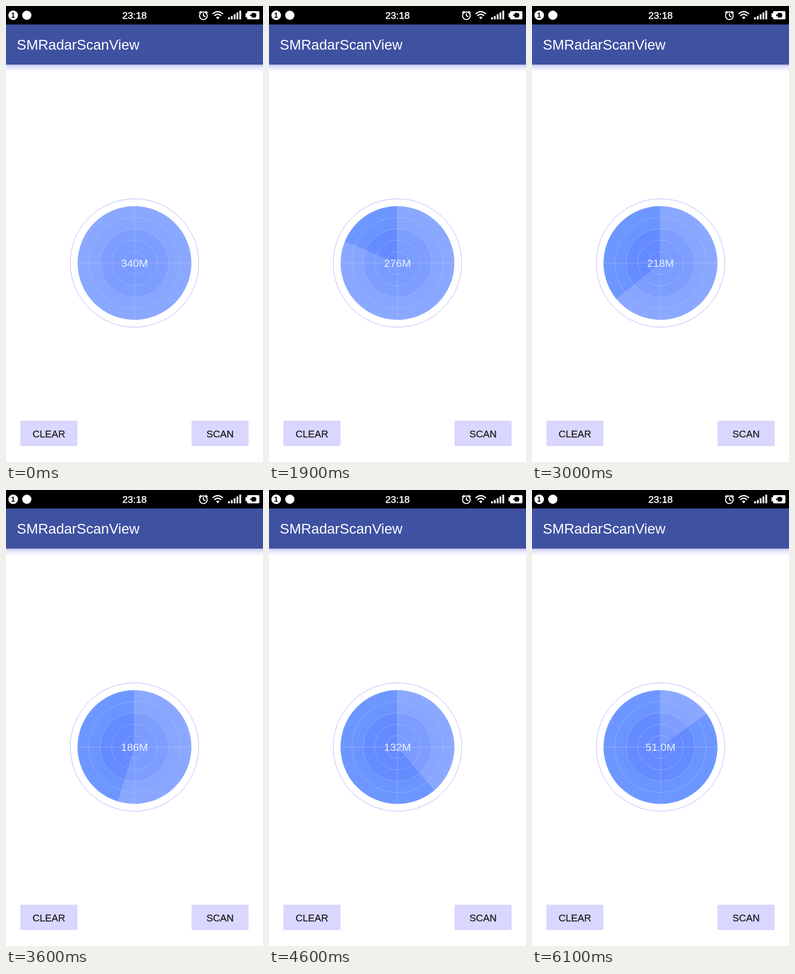
An HTML page for the animation above (6.2 s loop, 500 by 888 pixels).

```html
<!DOCTYPE html>
<html lang="en">
<head>
<meta charset="utf-8">
<title>Radar scan</title>
<style>
  html, body { margin: 0; width: 100%; height: 100%; overflow: hidden; background: #fff; }
  svg { display: block; width: 100%; height: 100%; font-family: "Liberation Sans", Arial, sans-serif; }
  .button { fill: #d9d7ff; }
  .mid { text-anchor: middle; }
  .line { fill: none; stroke: #fff; stroke-width: 2; }
  .grid { fill: none; stroke: #b4cbff; stroke-opacity: .5; }
</style>
</head>
<body>
<svg viewBox="0 0 500 888">
  <defs>
    <linearGradient id="shadow" x2="0" y2="1">
      <stop stop-color="#b3b9e4"/>
      <stop offset=".25" stop-color="#e0defa"/>
      <stop offset="1" stop-color="#fff"/>
    </linearGradient>
    <radialGradient id="light" gradientUnits="userSpaceOnUse" cx="250" cy="500.5" r="111">
      <stop stop-color="#7799ff"/>
      <stop offset=".6" stop-color="#7f9fff"/>
      <stop offset=".6" stop-color="#87a5ff"/>
      <stop offset="1" stop-color="#8ba9ff"/>
    </radialGradient>
    <radialGradient id="dark" gradientUnits="userSpaceOnUse" cx="250" cy="500.5" r="111">
      <stop stop-color="#6489ff"/>
      <stop offset=".6" stop-color="#648cff"/>
      <stop offset=".6" stop-color="#6a93ff"/>
      <stop offset="1" stop-color="#6e98ff"/>
    </radialGradient>
  </defs>
  <rect width="500" height="888" fill="#fff"/>

  <!-- status bar -->
  <rect width="500" height="36"/>
  <g fill="#fff">
    <circle cx="14" cy="18" r="9.3"/>
    <text class="mid" x="13.7" y="23" font-size="14" font-weight="bold" fill="#000">1</text>
    <circle cx="40.5" cy="18" r="9"/>
    <text class="mid" x="250" y="25" font-size="19" stroke="#fff" stroke-width=".5">23:18</text>
    <g class="line">
      <circle cx="384" cy="19" r="7.5"/>
      <path d="M384 14V19L388 21M375.500 13.500L380 10M392.500 13.500L388 10"/>
      <path d="M402 15.500Q412 6.500 422 15.500M405.500 19Q412 13 418.500 19" stroke-width="2.4"/>
    </g>
    <path d="M408.500 22Q412 19 415.500 22L412 26Z"/>
    <path d="M432 22h3.500v4h-3.500zM437.500 19.500h3.500v6.500h-3.500zM443 16h3.500v10h-3.500zM448.500 12.500h3.500v13.500h-3.500zM454 9h3.500v17h-3.500z"/>
    <path d="M471 10h20q2 0 2 2v12q0 2-2 2h-20q-2 0-2-2v-2h-3v-8h3v-2q0-2 2-2z"/>
    <path d="M475 16.500h3v-3h5q4 0 4 4.500t-4 4.500h-5v-3h-3z" fill="#000"/>
  </g>

  <!-- title bar -->
  <rect y="36" width="500" height="78" fill="#3f51a1"/>
  <rect y="114" width="500" height="14" fill="url(#shadow)"/>
  <text x="21" y="85" font-size="27.600" fill="#fff">SMRadarScanView</text>

  <!-- radar -->
  <circle cx="250" cy="500.500" r="125" fill="none" stroke="#b9b4ff"/>
  <circle cx="250" cy="500.500" r="110.700" fill="url(#light)"/>
  <path id="sweep" fill="url(#dark)"/>
  <g class="grid">
    <circle cx="250" cy="500.500" r="22.200"/>
    <circle cx="250" cy="500.500" r="44.400"/>
    <circle cx="250" cy="500.500" r="66.600"/>
    <circle cx="250" cy="500.500" r="88.800"/>
    <path d="M139.500 500.500H360.500M250 390V611"/>
  </g>
  <text id="range" class="mid" x="250" y="508" font-size="21" fill="#fff" fill-opacity=".85"></text>

  <!-- buttons -->
  <rect class="button" x="28" y="807.500" width="111" height="49.500" rx="2"/>
  <rect class="button" x="361" y="807.500" width="111" height="49.500" rx="2"/>
  <g class="mid" font-size="19" fill="#1b1a1e" stroke="#1b1a1e" stroke-width=".3">
    <text x="83.500" y="840">CLEAR</text>
    <text x="416.500" y="840">SCAN</text>
  </g>
</svg>
<script>
  const LOOP = 6200, STEP = 100, FULL = 340;
  const CX = 250, CY = 500.5, R = 110.7;
  // [time in ms, range in metres]
  const keys = [[0, 340], [730, 340], [1100, 320], [1900, 276], [3000, 218],
                [3600, 186], [4600, 132], [6100, 51]];
  const sweep = document.getElementById("sweep");
  const range = document.getElementById("range");

  function rangeAt(t) {
    const i = Math.max(1, keys.findIndex(k => k[0] >= t));
    const [t0, v0] = keys[i - 1], [t1, v1] = keys[i];
    return v0 + (v1 - v0) * (t - t0) / (t1 - t0);
  }

  function draw(now) {
    const t = Math.floor(now % LOOP / STEP) * STEP;
    const v = rangeAt(t);
    const a = v / FULL * 2 * Math.PI;
    const x = CX + R * Math.sin(a), y = CY - R * Math.cos(a);
    sweep.setAttribute("d", v < FULL
      ? `M${CX} ${CY}L${x} ${y}A${R} ${R} 0 ${a < Math.PI ? 1 : 0} 1 ${CX} ${CY - R}Z` : "");
    range.textContent = v.toPrecision(3) + "M";
  }

  const start = performance.now();
  function tick() {
    draw(performance.now() - start);
    requestAnimationFrame(tick);
  }
  tick();
</script>
</body>
</html>
```
